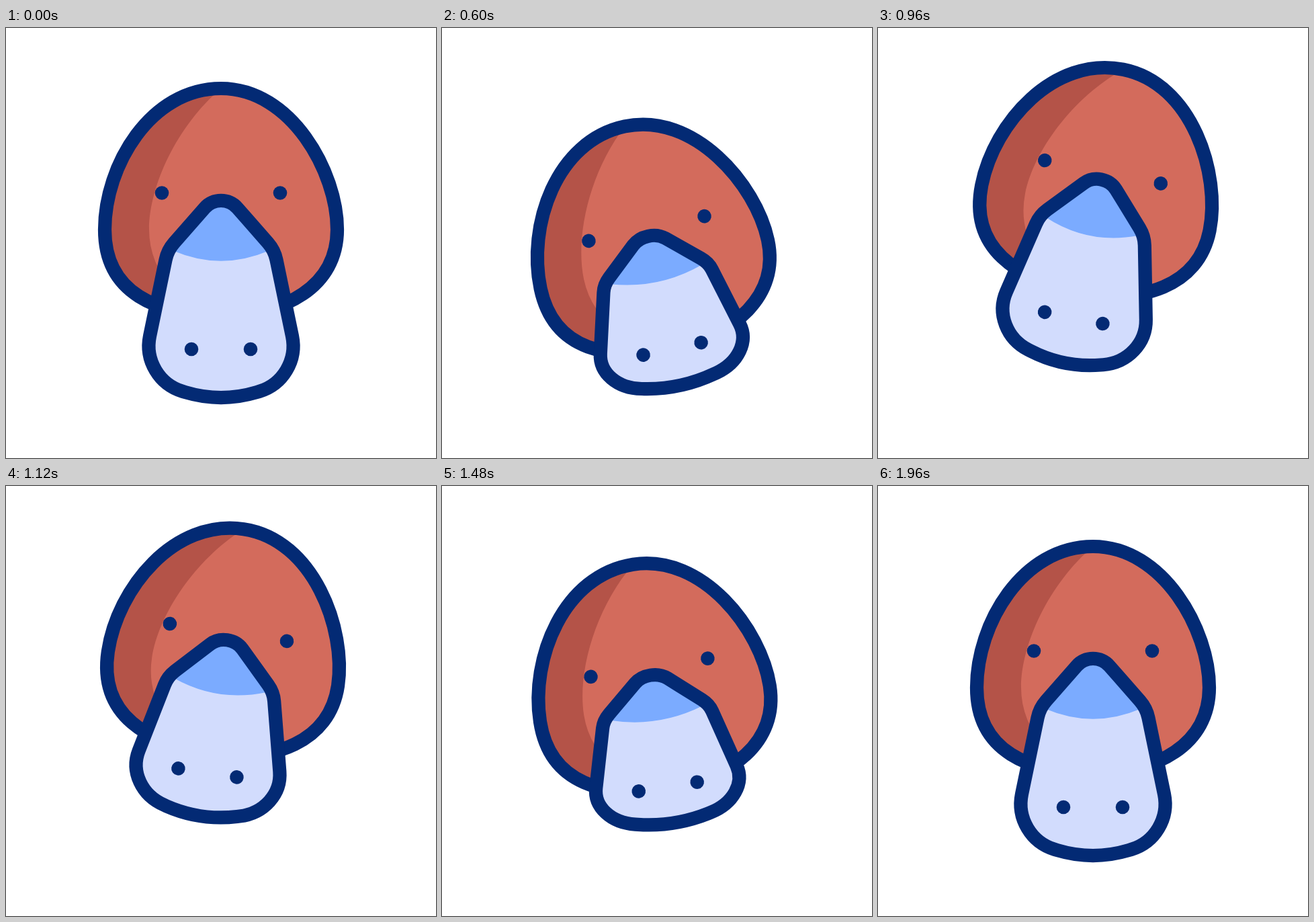
These frames come from a looping animation (640x640 px, 2 s). An HTML page with a canvas:

```html
<!DOCTYPE html>
<html lang="en">
<head>
<meta charset="utf-8">
<title>Nodding platypus</title>
<style>
html, body { margin: 0; width: 100%; height: 100%; overflow: hidden; background: #fff; }
canvas { display: block; width: 640px; height: 640px; }
</style>
</head>
<body>
<canvas id="stage" width="640" height="640"></canvas>
<script>
const ctx = document.getElementById('stage').getContext('2d');
const LOOP = 2000, STEP = 40;
const NAVY = '#032a74', FUR = '#d36b5c', SHADE = '#b45348', BILL = '#d2dcfd', BLUE = '#7babff';
const CENTRE = 320, BILL_TOP = 257, NOSTRIL = 478;

// Swings between [ms, value] turning points, starting and ending at rest
function swing(rest, ...turns) {
  return t => {
    let [t0, v0] = [0, rest];
    for (const [t1, v1] of turns) {
      if (t < t1) return v0 + (v1 - v0) * ease((t - t0) / (t1 - t0));
      [t0, v0] = [t1, v1];
    }
    return rest;
  };
}
const ease = u => (1 - Math.cos(Math.PI * u)) / 2;

const tilt = swing(0, [530, -13.3], [1020, 12.2], [1390, -9.9], [1830, 0]);
const drop = swing(0, [520, 57], [1030, -37], [1400, 25.4], [1910, 0]);
const squash = swing(1, [480, 0.735], [900, 0.95], [1018, 0.95], [1370, 0.71], [1775, 1]);

// Closed polygon from [x, y, radius] corners
function rounded(corners) {
  const path = new Path2D();
  const [first, last] = [corners[0], corners[corners.length - 1]];
  path.moveTo((first[0] + last[0]) / 2, (first[1] + last[1]) / 2);
  corners.forEach(([x, y, r], i) => {
    const [nx, ny] = i + 1 < corners.length ? corners[i + 1]
      : [(first[0] + last[0]) / 2, (first[1] + last[1]) / 2];
    path.arcTo(x, y, nx, ny, r);
  });
  path.closePath();
  return path;
}

const shoulder = [240.5, 330.8, 55], cheek = [200.8, 522.3, 71];
const flip = ([x, y, r]) => [2 * CENTRE - x, y, r];
const bill = rounded([[CENTRE, 240.1, 32.6], shoulder, cheek, [CENTRE, 558, 185], flip(cheek), flip(shoulder)]);

const head = new Path2D('M320 90C215 90 147 205 147 300S225 427.5 320 427.5S493 385 493 300S425 90 320 90Z');
const shadow = new Path2D('M320 90C255 145 213 235 213 300Q213 350 250 390V440H100V80Z');
const bridge = new Path2D('M250 332Q320 361.5 390 332V240H250Z');

function shape(outline, fill, inner, innerFill) {
  ctx.save();
  ctx.clip(outline);
  ctx.fillStyle = fill;
  ctx.fill(outline);
  ctx.fillStyle = innerFill;
  ctx.fill(inner);
  ctx.restore();
  ctx.strokeStyle = NAVY;
  ctx.lineWidth = 20.2;
  ctx.lineJoin = 'round';
  ctx.stroke(outline);
}

function dots(gap, y) {
  ctx.fillStyle = NAVY;
  for (const side of [-1, 1]) {
    ctx.beginPath();
    ctx.arc(CENTRE + side * gap, y, 10.3, 0, Math.PI * 2);
    ctx.fill();
  }
}

// Squashes the outline alone, so that the stroke keeps its weight
function squashed(path, s) {
  const out = new Path2D();
  out.addPath(path, { a: 1, b: 0, c: 0, d: s, e: 0, f: BILL_TOP * (1 - s) });
  return out;
}

function draw(t) {
  const s = squash(t);
  ctx.setTransform(1, 0, 0, 1, 0, 0);
  ctx.fillStyle = '#fff';
  ctx.fillRect(0, 0, 640, 640);
  ctx.translate(CENTRE, CENTRE + drop(t));
  ctx.rotate(tilt(t) * Math.PI / 180);
  ctx.translate(-CENTRE, -CENTRE);

  shape(head, FUR, shadow, SHADE);
  dots(88, 245.5);
  shape(squashed(bill, s), BILL, squashed(bridge, s), BLUE);
  dots(44, BILL_TOP + (NOSTRIL - BILL_TOP) * s);
}

const begin = performance.now();
function tick() {
  const t = (performance.now() - begin) % LOOP;
  draw(Math.floor(t / STEP) * STEP);
  requestAnimationFrame(tick);
}
draw(0);
requestAnimationFrame(tick);
</script>
</body>
</html>
```
